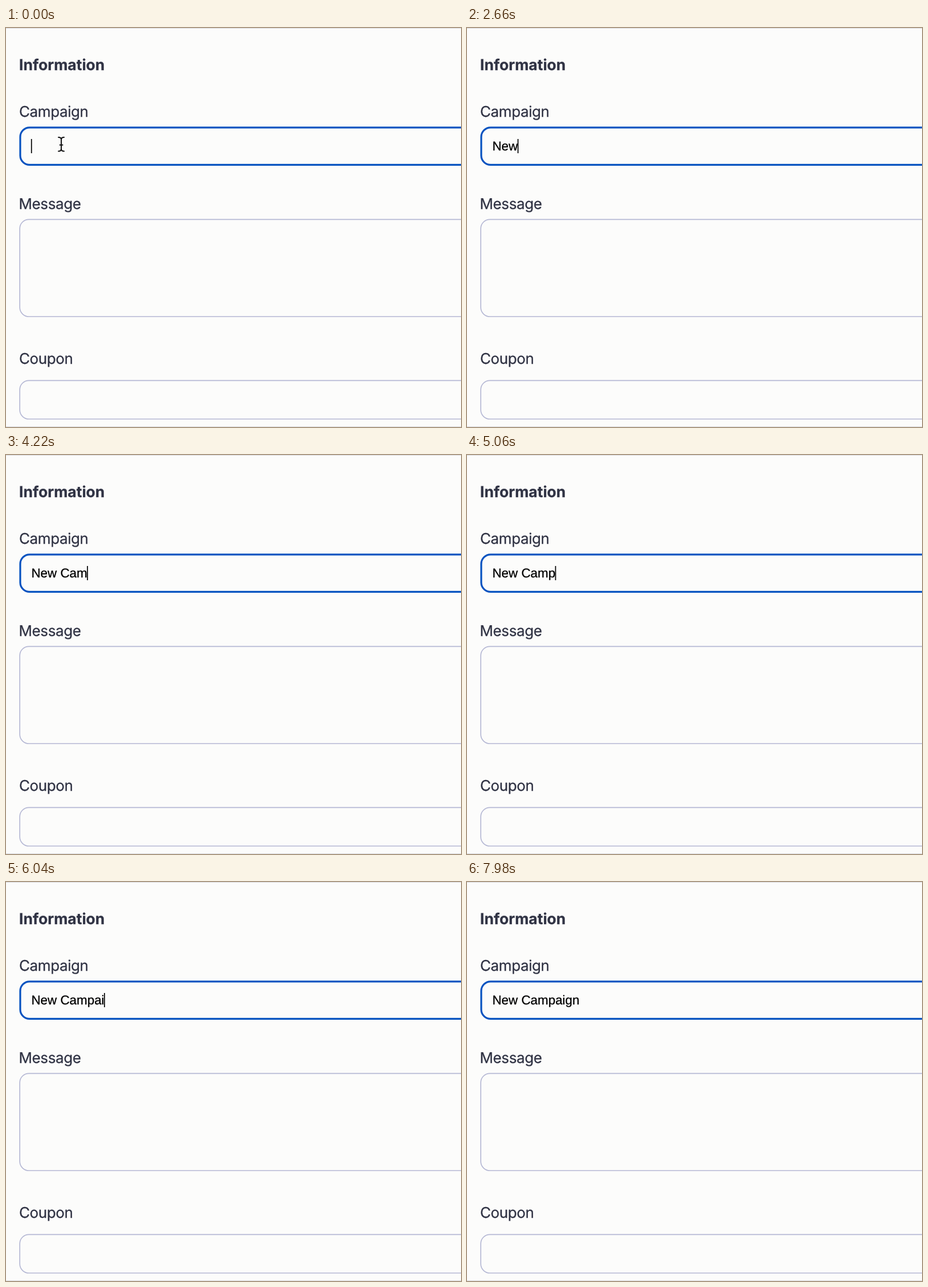
Write an HTML page that moves like this. It is 799 px wide and 701 px high and loops after 8 s.

```html
<!DOCTYPE html>
<html lang="en">
<head>
<meta charset="utf-8">
<title>Campaign form</title>
<style>
  html, body { margin: 0; width: 100%; height: 100%; overflow: hidden; background: #fcfcfb; }
  svg { display: block; width: 100%; height: 100%; }
  text { white-space: pre; text-rendering: geometricPrecision; stroke-width: 0.3; }
  .label { font: 400 26px Inter, sans-serif; letter-spacing: -0.4px; fill: #303344; stroke: #303344; }
  .title { font-size: 26.5px; font-weight: 700; letter-spacing: 0; }
  .field { fill: none; stroke: #b5b8d4; stroke-width: 1.7; }
  .focused { stroke: #0753c0; stroke-width: 3.2; }
  .edge { fill: #d9d9de; }
  #typed { font: 22.4px "Liberation Sans", Arial, sans-serif; fill: #000; stroke: #000; }
  #pointer use { fill: none; stroke-linecap: round; }
</style>
</head>
<body>
<svg viewBox="0 0 799 701">
  <defs>
    <path id="beam" d="M92 192 Q97 192 97 196 Q97 192 102 192 M97 196 V212 M92 216.5 Q97 216.5 97 212 Q97 216.5 102 216.5 M94.5 205.5 H99.5"/>
  </defs>

  <rect class="edge" width="799" height="1"/>
  <rect class="edge" y="700" width="799" height="1"/>

  <text class="label title" x="23" y="74">Information</text>
  <text class="label" x="23" y="155.5">Campaign</text>
  <text class="label" x="22.5" y="318">Message</text>
  <text class="label" x="23" y="589.5">Coupon</text>

  <rect class="field focused" x="25" y="174.9" width="900" height="65.5" rx="16.5"/>
  <rect class="field" x="24.2" y="336.3" width="900" height="170.7" rx="16"/>
  <rect class="field" x="24.2" y="619.3" width="900" height="67.7" rx="16"/>

  <text id="typed" x="44.4" y="215"></text>
  <rect id="caret" y="195" width="1.7" height="25"/>

  <g id="pointer">
    <use href="#beam" stroke="#fff" stroke-width="4.5"/>
    <use href="#beam" stroke="#111" stroke-width="2"/>
  </g>
</svg>
<script>
  const LOOP = 8000;
  const BLINK = 420;
  const CARET_X = 43.9;
  const TEXT = "New Campaign";
  const KEY_TIMES = [1800, 2150, 2500, 2920, 3340, 3760, 4180, 4740, 5160, 5720, 6700, 7540];

  const typed = document.getElementById("typed");
  const caret = document.getElementById("caret");
  const pointer = document.getElementById("pointer");
  const show = (node, on) => node.setAttribute("visibility", on ? "visible" : "hidden");

  function draw(time) {
    const count = KEY_TIMES.filter(key => key <= time).length;
    const value = TEXT.slice(0, count);
    if (typed.textContent !== value) typed.textContent = value;

    // Each key press restarts the caret's blink.
    const lastKey = count ? KEY_TIMES[count - 1] : 0;
    const width = count ? typed.getComputedTextLength() : 0;
    caret.setAttribute("x", CARET_X + width);
    show(caret, Math.floor((time - lastKey) / BLINK) % 2 === 0);
    show(pointer, count === 0);
  }

  const start = performance.now();
  function tick() {
    draw((performance.now() - start) % LOOP);
    requestAnimationFrame(tick);
  }
  tick();
</script>
</body>
</html>
```
